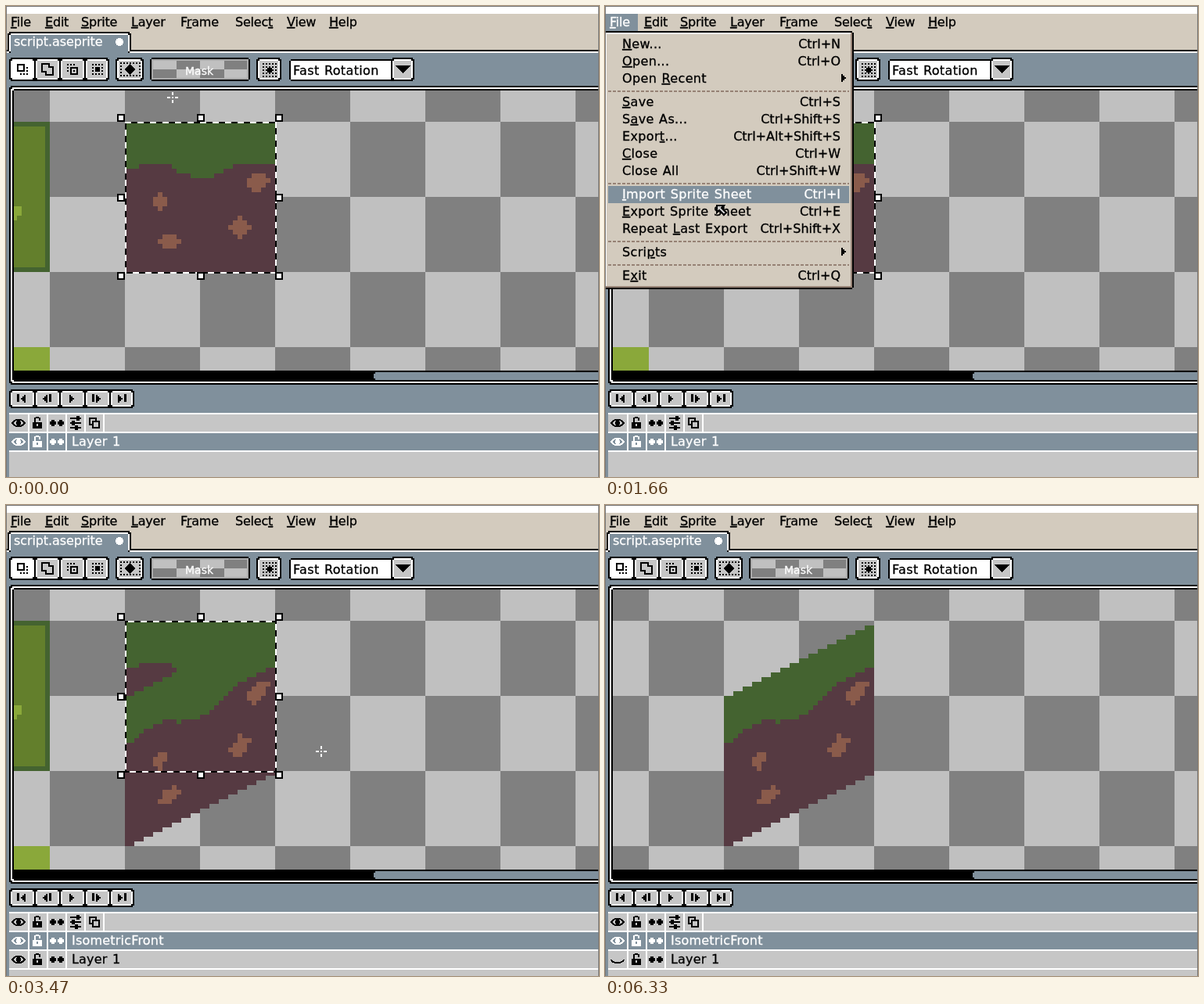
An HTML page that plays this animation: 758x602 px, repeating every 7520 ms.

```html
<!DOCTYPE html>
<html lang="en">
<head>
<meta charset="utf-8">
<title>Isometric script</title>
<style>
html, body { margin: 0; width: 100%; height: 100%; overflow: hidden; }
svg { display: block; width: 758px; height: 602px; }
text { font: 16px "DejaVu Sans", sans-serif; letter-spacing: .35px; word-spacing: 1px; stroke-width: .3px; white-space: pre; }
</style>
</head>
<body>
<svg id="stage" viewBox="0 0 758 602" shape-rendering="crispEdges"></svg>
<script>
const LOOP = 7520, STEP = 138.5, ANT_TICK = 100;
const BLUE = '#80909c', BEIGE = '#d3cbbe', BROWN = '#968275', FACE = '#c6c6c6', LIGHT = '#c0c0c0', DARK = '#808080',
  GRASS = '#446330', LEAF = '#637f2c', LIME = '#8aa83a', DIRT = '#563a42', STONE = '#8a5b4b', HOT = '#ffebb6';

// time, cursor (+ cross, > arrow), x, y, menu row, submenu row
const KEYS = [
  [0, '+', 213, 117], [140, '+', 117, 117], [280, '>', 76, 60], [410, '>', 56, 22],
  [560, '>', 30, 21], [710, '>', 23, 20], [840, '>', 21, 18], [1410, '>', 30, 62, 0],
  [1540, '>', 94, 172, 5], [1660, '>', 142, 254, 10], [1810, '>', 146, 284, 12],
  [1950, '>', 150, 308, 14], [2200, '>', 152, 324, 14], [2490, '>', 246, 319, 14],
  [2640, '>', 334, 318, 14, 0], [2770, '>', 381, 325, 14, 1], [2920, '>', 372, 322, 14, 1],
  [3070, '>', 370, 314, 14, 0], [3210, '+', 403, 315], [4990, '>', 140, 440],
  [5110, '>', 20, 496], [5260, '']
];
const BAR = [['_File', 6], ['_Edit', 50], ['_Sprite', 96], ['_Layer', 160],
  ['F_rame', 223], ['Selec_t', 293], ['_View', 359], ['_Help', 413]];
const FILE = [['_New...', 'Ctrl+N'], ['_Open...', 'Ctrl+O'], ['Open _Recent', '>'], 0,
  ['_Save', 'Ctrl+S'], ['S_ave As...', 'Ctrl+Shift+S'], ['Expor_t...', 'Ctrl+Alt+Shift+S'],
  ['_Close', 'Ctrl+W'], ['Close All', 'Ctrl+Shift+W'], 0,
  ['_Import Sprite Sheet', 'Ctrl+I'], ['_Export Sprite Sheet', 'Ctrl+E'],
  ['Repeat _Last Export', 'Ctrl+Shift+X'], 0, ['Scri_pts', '>'], 0, ['E_xit', 'Ctrl+Q']];
const SCRIPTS = [['square-to-isometric-front'], ['square-to-isometric-side'], ['square-to-isometric-tile'], 0,
  ['_Open Scripts Folder'], ['_Rescan Scripts Folder', 'F5']];
// row, column, width in art pixels
const STONES = [[11, 27, 3], [12, 26, 5], [13, 26, 4], [14, 27, 2],
  [15, 7, 1], [16, 6, 3], [17, 6, 3], [18, 7, 1],
  [20, 24, 1], [21, 23, 3], [22, 22, 5], [23, 23, 3], [24, 24, 1],
  [24, 8, 3], [25, 7, 5], [26, 8, 3]];
// first column and depth of each grass step
const EDGE = [[0, 10], [3, 9], [10, 10], [11, 11], [14, 12], [19, 11], [21, 10], [23, 9]];

const stage = document.getElementById('stage');
let out;

const last = (list, v) => list.filter(k => k[0] <= v).pop();
const rect = (x, y, w, h, c) => out += `<rect x="${x}" y="${y}" width="${w}" height="${h}" fill="${c}"/>`;
const frame = (x, y, w, h, c, extra = '') =>
  out += `<rect x="${x + 1}" y="${y + 1}" width="${w - 2}" height="${h - 2}" fill="none" stroke="${c}" stroke-width="2" ${extra}/>`;
const path = (d, fill, stroke = 'none', x = 0, y = 0, extra = '') =>
  out += `<path d="${d}" transform="translate(${x} ${y})" fill="${fill}" stroke="${stroke}" stroke-width="2" ${extra}/>`;
const disc = (x, y, r, c) => out += `<circle cx="${x}" cy="${y}" r="${r}" fill="${c}"/>`;
function text(s, x, y, c = '#000', end = false, style = '') {
  s = s.replace(/_(.)/, '<tspan text-decoration="underline">$1</tspan>');
  out += `<text x="${x}" y="${y}" fill="${c}" stroke="${c}" style="${style}"${end ? ' text-anchor="end"' : ''}>${s}</text>`;
}
function rounded(x, y, w, h, c) {
  rect(x + 2, y, w - 4, h, c);
  rect(x, y + 2, w, h - 4, c);
}
// a row of n joined buttons, each w wide
function buttons(x, y, w, h, n = 1, firstFace = FACE) {
  rounded(x, y, w * n, h, '#000');
  for (let i = 0; i < n; i++) {
    const bx = x + i * w + 2, bw = w - (i == n - 1 ? 4 : 2);
    rounded(bx, y + 2, bw, h - 4, '#fff');
    rect(bx + 2, y + 4, bw - 4, h - 8, i ? FACE : firstFace);
  }
}
function dots(x, y, cols, rows, hollow) {
  for (let i = 0; i < cols; i++) for (let j = 0; j < rows; j++)
    if (!hollow || !i || !j || i == cols - 1 || j == rows - 1) rect(x + i * 4, y + j * 4, 2, 2, '#000');
}

function toolbar() {
  buttons(4, 66, 32, 30, 4, '#fff');
  frame(14, 74, 10, 10, '#000');
  dots(26, 78, 1, 3);
  dots(18, 86, 2, 1);
  path('M46 74h9v4h5v10h-9v-4h-5z', 'none', '#000');
  dots(78, 74, 3, 3);
  frame(82, 78, 10, 10, '#000');
  dots(110, 74, 4, 4, true);
  rect(114, 78, 6, 6, '#000');
  buttons(140, 66, 36, 30);
  dots(146, 72, 7, 5, true);
  path('M158 74l7 7-7 7-7-7z', '#000');

  rounded(184, 66, 128, 30, '#000');
  for (let i = 0; i < 4; i++) for (let j = 0; j < 2; j++)
    rect(187 + i * 30.5, 69 + j * 12, 30.5, 12, (i + j) % 2 ? DARK : LIGHT);
  frame(186, 68, 124, 26, '#aaa');
  text('Mask', 229, 88, '#fff', false, 'font-size:14px;letter-spacing:0');

  buttons(320, 66, 32, 30);
  dots(328, 73, 5, 5);
  rect(334, 79, 6, 6, '#000');
  rounded(362, 68, 134, 28, '#000');
  rect(364, 70, 128, 24, '#fff');
  text('Fast Rotation', 367, 88);
  buttons(492, 66, 30, 30);
  path('M497 76h20l-10 10z', '#000');
}

function tile(shear) {
  const px = (c, r, h, col) => rect(152 + c * 6, 148 + (r + (shear ? 16 - (c >> 1) : 0)) * 6, 6, h * 6, col);
  for (let c = 0; c < 32; c++) {
    const depth = last(EDGE, c)[1];
    px(c, 0, depth, GRASS);
    px(c, depth, 32 - depth, DIRT);
  }
  for (const [r, c, w] of STONES) for (let i = 0; i < w; i++) px(c + i, r, 1, STONE);
}

function editor(s) {
  rounded(4, 102, 770, 382, '#000');
  rounded(6, 104, 770, 378, '#fff');
  rounded(8, 106, 770, 374, '#000');
  for (let i = 0; i < 9; i++) for (let j = 0; j < 5; j++) {
    const x = Math.max(10, i * 96 - 40), y = Math.max(108, 52 + j * 96);
    rect(x, y, i * 96 + 56 - x, Math.min(466, 148 + j * 96) - y, (i + j) % 2 ? LIGHT : DARK);
  }
  if (s.base) {
    rect(10, 148, 46, 192, GRASS);
    rect(10, 154, 40, 180, LEAF);
    rect(10, 256, 10, 12, LIME);
    rect(10, 268, 4, 6, LIME);
    rect(10, 436, 46, 30, LIME);
    tile(false);
  }
  if (s.iso) tile(true);
  rounded(470, 468, 300, 10, BLUE);
  if (s.sel) {
    frame(152, 148, 194, 194, '#fff');
    frame(152, 148, 194, 194, '#000', `stroke-dasharray="8 8" stroke-dashoffset="${-7 - 2 * s.ants}"`);
    for (const x of [142, 244, 344]) for (const y of [138, 240, 340]) if (x != 244 || y != 240) {
      rect(x, y, 10, 10, '#000');
      rect(x + 2, y + 2, 6, 6, '#fff');
    }
  }
}

function layerIcons(y, c, open = true) {
  if (open) {
    path('M8 0q8-9 16 0q-8 9-16 0z', 'none', c, 0, y);
    disc(16, y, 3, c);
  } else path('M8 0q1 4 8 4q7 0 8-4', 'none', c, 0, y);
  rect(34, y - 1, 12, 8, c);
  path('M37-1v-4q0-2 3-2q3 0 3 2v2', 'none', c, 0, y);
  rect(39, y + 1, 2, 3, c == '#fff' ? BLUE : FACE);
  rounded(56, y - 4, 8, 8, c);
  rounded(66, y - 4, 8, 8, c);
}

function layer(y, name, active, open, hover) {
  const c = active ? '#fff' : '#000';
  rect(4, y, 754, 22, active ? BLUE : FACE);
  if (hover) rect(4, y, 24, 22, '#e4e4e4');
  for (const x of [28, 52, 76]) rect(x, y, 2, 22, '#fff');
  rect(4, y + 22, 754, 2, '#fff');
  layerIcons(y + 11, c, open);
  text(name, 84, y + 16, c, false, 'letter-spacing:.2px');
}

function timeline(s) {
  buttons(4, 490, 32, 24, 5);
  const arrow = 'M-3-5h2v2h2v2h2v2h-2v2h-2v2h-2z';
  path(arrow, '#000', 'none', 84, 502);
  // skip buttons carry the bar ahead of the arrow, step buttons behind it
  for (const [x, dir, bar] of [[20, -1, 3], [52, -1, -6], [116, 1, -6], [148, 1, 3]]) {
    out += `<g transform="translate(${x} 501) scale(${dir} 1)">`;
    path(arrow, '#000', 'none', bar > 0 ? -2 : 2, 1);
    rect(bar, -5, 3, 10, '#000');
    out += '</g>';
  }
  rect(4, 520, 754, 82, FACE);
  rect(4, 520, 754, 2, '#fff');
  rect(4, 544, 754, 2, '#fff');
  for (const x of [28, 52, 76, 100, 124]) rect(x, 522, 2, 22, '#fff');
  layerIcons(533, '#000');
  for (const [y, x] of [[527, 90], [533, 84], [539, 88]]) {
    rect(82, y - 1, 14, 2, '#000');
    rect(x, y - 3, 4, 6, '#000');
  }
  frame(106, 526, 10, 10, '#000');
  rect(110, 530, 10, 10, FACE);
  frame(110, 530, 10, 10, '#000');
  if (s.iso) layer(546, 'IsometricFront', true, true);
  layer(s.iso ? 570 : 546, 'Layer 1', !s.iso, s.base, s.eyeHot);
}

function popup(x, y, w, h, endX, items, hot) {
  rounded(x, y, w, h, '#000');
  rect(x + 2, y + 2, w - 4, h - 4, BROWN);
  rect(x + 2, y + 2, w - 6, h - 6, '#fff');
  rect(x + 4, y + 4, w - 8, h - 8, BEIGE);
  let cy = y + 16;
  items.forEach((item, i) => {
    if (!item) {
      path(`M${x + 6} ${cy - 5}H${x + w - 6}`, 'none', BROWN, 0, 0, 'stroke-dasharray="4 2"');
      cy += 8;
      return;
    }
    const c = i === hot ? '#fff' : '#000';
    if (i === hot) rect(x + 6, cy - 10, w - 12, 22, BLUE);
    text(item[0], x + 24, cy + 6, c);
    if (item[1] == '>') path('M0-5h2v2h2v2h2v2h-2v2h-2v2h-2z', c, 'none', x + 304, cy);
    else if (item[1]) text(item[1], endX, cy + 6, c, true, 'letter-spacing:0');
    cy += 22;
  });
}

function cursor(kind, x, y) {
  if (kind == '+') {
    rect(x - 1, y - 1, 2, 2, '#fff');
    for (const d of [-7, 3]) {
      rect(x - 1, y + d, 2, 4, '#fff');
      rect(x + d, y - 1, 4, 2, '#fff');
    }
  } else if (kind) path('M1 1H10L7 4L13 10L10 13L4 7L1 10Z', FACE, '#000', x, y);
}

function draw(s) {
  out = '';
  rect(0, 0, 758, 602, BLUE);
  rect(0, 0, 758, 10, '#fff');
  rect(0, 10, 758, 46, BEIGE);
  rect(0, 56, 758, 2, '#000');
  rect(0, 58, 758, 2, '#fff');
  rounded(2, 33, 158, 27, '#000');
  rounded(4, 35, 154, 25, '#fff');
  rect(6, 37, 150, 23, BLUE);
  text('script.aseprite', 10, 51, '#fff', false, 'letter-spacing:-.1px');
  disc(145, 46, 5, '#fff');

  if (s.bar == 'edit') rect(42, 10, 44, 23, HOT);
  if (s.bar == 'file') rect(1, 10, 41, 23, s.menu ? BLUE : HOT);
  BAR.forEach(([name, x], i) => text(name, x, 26, s.menu && !i ? '#fff' : '#000', false, 'letter-spacing:-.2px'));

  toolbar();
  editor(s);
  timeline(s);
  if (s.menu) popup(-2, 32, 320, 330, 301, FILE, s.key[4]);
  if (s.sub) popup(316, 298, 270, 130, 568, SCRIPTS, s.key[5]);
  cursor(...s.key.slice(1, 4));
  rect(0, 0, 758, 1, '#777');
  rect(0, 0, 1, 602, '#777');
  rect(757, 0, 1, 602, '#777');
  stage.innerHTML = out;
}

function stateAt(t) {
  const within = (a, b) => t >= a && t < b;
  const sel = t < 4550;
  const held = Math.floor(t / STEP + .15) * STEP;
  return {
    key: last(KEYS, t),
    bar: within(410, 560) ? 'edit' : within(560, 3210) ? 'file' : '',
    menu: within(1110, 3210),
    sub: within(2080, 3210),
    iso: t >= 3340,
    base: t < 5920,
    eyeHot: within(5660, 6330),
    sel,
    ants: sel ? Math.floor(held / ANT_TICK) % 8 : 0
  };
}

let shown = '';
function tick(now) {
  const s = stateAt(now % LOOP), id = JSON.stringify(s);
  if (id != shown) draw(s);
  shown = id;
  requestAnimationFrame(tick);
}
tick(performance.now());
</script>
</body>
</html>
```
